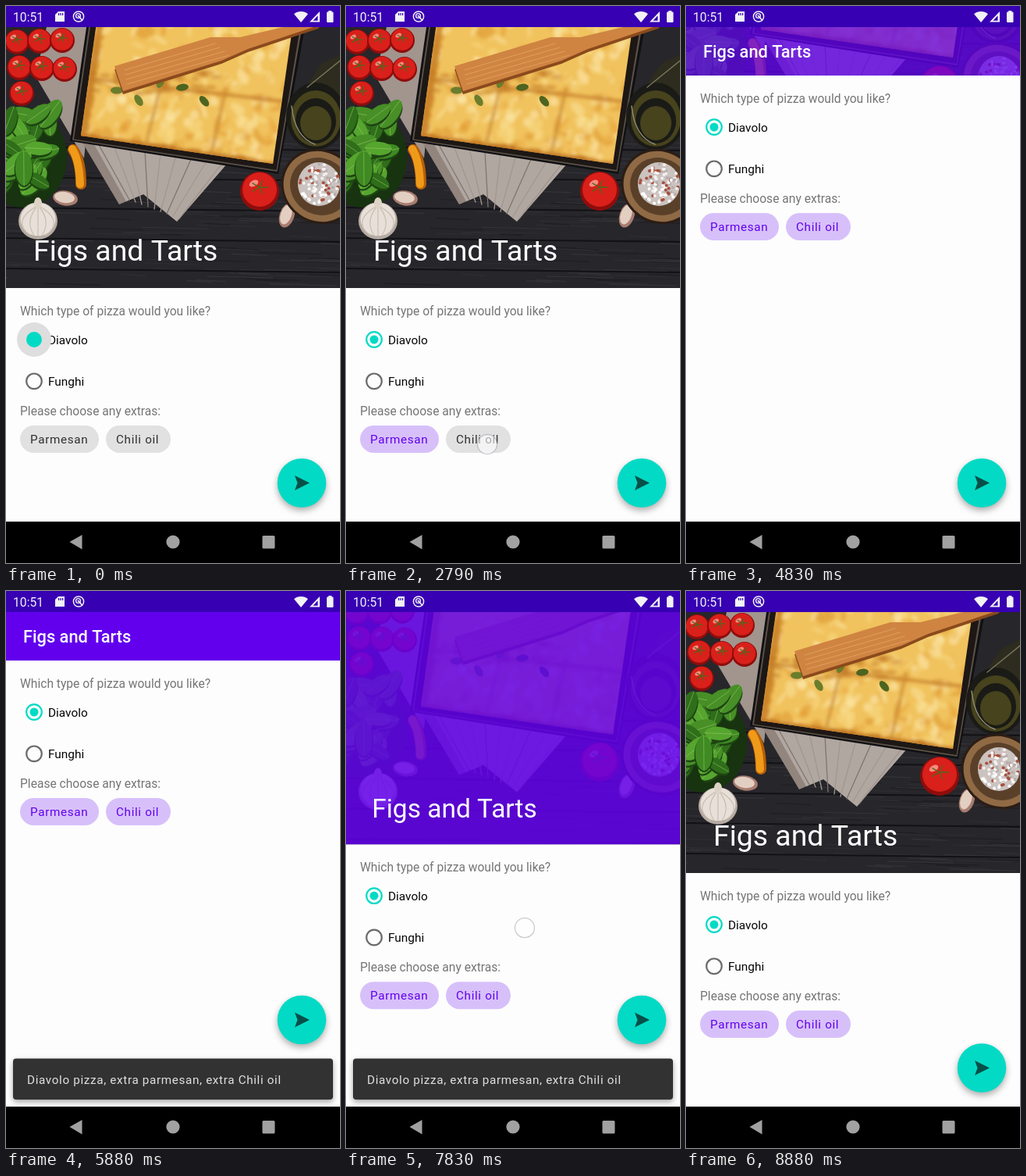
An HTML page with a canvas for the animation above (9.75 s loop, 428 by 713 pixels).

```html
<!DOCTYPE html>
<html lang="en">
<head>
<meta charset="utf-8">
<title>Pizza order screen</title>
<style>
html, body { margin: 0; width: 100%; height: 100%; overflow: hidden; background: #000; }
canvas { display: block; }
</style>
</head>
<body>
<canvas id="stage" width="428" height="713"></canvas>
<script>
const LOOP = 9750, W = 428, H = 713, BAR = 361, RANGE = 272, TAU = Math.PI * 2;
const PAPER = '#fdfdfd', TEAL = '#03dac5', PRIMARY = '#6200ee', STATUS = '#3700b3';
const GREY = '#757575', INK = '#f2f2f5';
const stage = document.getElementById('stage').getContext('2d');
let c = stage;

const clamp = x => Math.max(0, Math.min(1, x));
const span = (t, from, to) => clamp((t - from) / (to - from));
const mix = (a, b, p) => a + (b - a) * p;

let seed = 7;
const random = (from = 0, to = 1) => {
  seed = seed * 16807 % 2147483647;
  return mix(from, to, seed / 2147483647);
};
const pick = (...list) => list[Math.floor(random(0, list.length))];
const times = (n, draw) => { for (let i = 0; i < n; i++) draw(i); };

// ---- drawing helpers ----
function trace(...p) {
  c.beginPath();
  for (let i = 0; i < p.length; i += 2) c.lineTo(p[i], p[i + 1]);
  c.closePath();
}
function poly(color, ...p) {
  c.fillStyle = color;
  trace(...p);
  c.fill();
}
function oval(color, x, y, rx, ry = rx, angle = 0) {
  c.fillStyle = color;
  c.beginPath();
  c.ellipse(x, y, rx, ry, angle, 0, TAU);
  c.fill();
}
function ring(color, x, y, r, width) {
  c.strokeStyle = color;
  c.lineWidth = width;
  c.beginPath();
  c.arc(x, y, r, 0, TAU);
  c.stroke();
}
function curve(color, width, x, y, ...p) {
  c.strokeStyle = color;
  c.lineWidth = width;
  c.lineCap = 'round';
  c.beginPath();
  c.moveTo(x, y);
  c.quadraticCurveTo(...p);
  c.stroke();
}
const line = (color, width, x, y, x2, y2) => curve(color, width, x, y, x, y, x2, y2);
function box(color, x, y, w, h, r = 0) {
  c.fillStyle = color;
  c.beginPath();
  c.roundRect(x, y, w, h, r);
  c.fill();
}
function label(text, x, y, size, color, spacing = 0, weight = 400) {
  c.font = `${weight} ${size}px Roboto, sans-serif`;
  c.letterSpacing = spacing + 'px';
  c.fillStyle = color;
  c.fillText(text, x, y);
}
function withShadow(alpha, blur, dy, draw) {
  c.save();
  c.shadowColor = `rgba(0,0,0,${alpha})`;
  c.shadowBlur = blur;
  c.shadowOffsetY = dy;
  draw();
  c.restore();
}

// ---- header picture, painted once ----
function tomato(x, y, r) {
  oval('#8e0d0c', x, y, r);
  oval('#d9201a', x, y - r * .08, r * .88);
  oval('#f58d80', x - r * .3, y - r * .4, r * .25, r * .15, -.5);
  times(5, i => {
    const a = i * TAU / 5;
    line('#4c6a1e', 1.3, x, y - r * .2, x + Math.cos(a) * r * .45, y + (Math.sin(a) * .35 - .2) * r);
  });
}
function garlic(x, y, r) {
  oval('#b5aaa2', x, y, r, r * .95);
  oval('#e8e0d8', x, y - 2, r * .9, r * .85);
  times(5, i => curve('#c9bdb3', 1.2, x, y - r * .8, x + (i - 2) * r * .7, y, x + (i - 2) * r * .2, y + r * .75));
  oval('#ddd2c6', x, y - r * .9, r * .2, r * .3);
}
function clove(x, y, angle) {
  oval('#a87d70', x, y, 16, 9.5, angle);
  oval('#e3cfc2', x - 1, y - 1, 13, 7, angle);
}
function wood() {
  box('#27262a', 0, 0, W, BAR);
  times(160, () => {
    const x = random(-40, W), y = random(170, BAR);
    line(pick('#343338', '#1f1e22', '#2e2d31'), 1.2, x, y, x + random(30, 90), y + 2);
  });
  times(5, i => line('#121215', 2, 0, 180 + i * 39, W, 185 + i * 39));
}
function cloth() {
  poly('#a1958e', 58, 0, 120, 0, 100, 195, 38, 90);
  poly('#91857e', 92, 165, 120, 170, 190, 235, 145, 254);
  poly('#b1a7a1', 110, 172, 285, 200, 219, 276, 176, 241, 154, 250);
  times(9, i => line(i % 3 ? '#a2978f' : '#80756f', 1.3, 118 + i * 20, 176 + i * 3, 158 + i * 8, 248 + i * 3));
}
function lasagna() {
  const pan = (color, inset) =>
    poly(color, 107 + inset, 0, 388 - inset * 1.3, 0, 349 - inset / 2, 215 - inset, 82 + inset, 173 - inset / 2);
  pan('#111013', 0);
  pan('#5b5247', 3);
  pan('#1d1715', 5);
  c.save();
  trace(119, 0, 371, 0, 342, 202, 96, 166);
  c.clip();
  box('#f1c35e', 80, 0, 300, 220);
  c.filter = 'blur(2px)';
  times(260, () => oval(pick('#fbe6a480', '#f8d98490', '#d98a2470', '#fff0bd80', '#e9a63c80'),
    random(95, 370), random(0, 205), random(3, 13), random(2, 7), random(0, 3)));
  times(45, i => {
    oval('#b8651580', 95 + i * 5.6, 167 + i * .82, random(4, 10), random(2, 6));
    oval('#c4782090', 124 - i * .62, i * 4, random(3, 8), 5);
    oval('#b9691a70', random(110, 270), random(85, 112), random(3, 9), 3);
  });
  line('#c27b2a', 3, 100, 92, 355, 122);
  times(2, i => line('#c98a35', 3, 200 + i * 82, 95 + i * 10, 178 + i * 84, 182 + i * 12));
  c.restore();
  times(5, i => oval(pick('#4d6420', '#6a7d2c'), 142 + i * 28, 108 + 14 * Math.sin(i * 2), 8, 4.5, i));
}
function spatula() {
  const blade = (color, dy) =>
    poly(color, 139, 77 + dy, 262, 40 + dy, 300, 40 + dy, 410, 14 + dy, 400, 25 + dy, 310, 55 + dy, 276, 70 + dy, 150, 109 + dy);
  blade('#8a4a1c', 4);
  blade('#cf8442', 0);
  times(4, i => line('#e09c5a', 1.2, 152 + i, 82 + i * 6, 268 + i * 6, 48 + i * 5));
}
function vegetables() {
  times(7, i => {
    const row = Math.floor(i / 3), col = i % 3;
    tomato(14 + col * 29 + row * 3, 46 + row * 33 + col * 2 * (row - .5), 16);
  });
  oval('#17330f', 22, 194, 56, 64);
  times(34, () => {
    const x = random(-5, 62), y = random(138, 244), a = random(0, 3), r = random(14, 23);
    const dx = Math.cos(a) * r, dy = Math.sin(a) * r;
    oval('#1d4512', x, y + 2, r, r * .55, a);
    oval(pick('#3f8a22', '#56a52f', '#2f6e1a', '#478f26'), x, y, r, r * .5, a);
    line('#9ccb6a90', 1, x - dx, y - dy, x + dx, y + dy);
  });
  curve('#b55f08', 14, 86, 184, 96, 198, 96, 228);
  curve('#f09a1a', 10, 85, 183, 94, 198, 95, 228);
  garlic(41, 275, 25);
  clove(76, 246, .15);
  clove(360, 268, 1.9);
  tomato(325, 237, 25);
}
function oilAndSalt() {
  poly('#2d2c1e', 378, 112, 404, 74, 428, 62, 428, 124);
  times(4, i => oval(i % 2 ? '#46431d' : '#1a1a16', 397, 141 + i * 3, 38 - i * 6, 43 - i * 7));
  curve('#8d8b72', 1.5, 366, 128, 370, 168, 396, 177);
  line('#77755c', 1.5, 386, 104, 428, 70);
  const bowl = (color, r) => {
    c.lineJoin = 'round';
    oval(color, 402, 231, r * 1.08, r, .6);
  };
  bowl('#2b1d14', 47);
  bowl('#8f6a45', 44);
  bowl('#5a4029', 36);
  oval('#cbc3c0', 401, 228, 27, 28);
  times(110, () => {
    const a = random(0, TAU), r = Math.sqrt(random()) * 26;
    oval(pick('#f4f0f0', '#fff', '#a8503f', '#b5adab'), 401 + Math.cos(a) * r, 228 + Math.sin(a) * r, 2);
  });
}
function paintPhoto() {
  const sheet = document.createElement('canvas');
  sheet.width = W;
  sheet.height = BAR;
  c = sheet.getContext('2d');
  wood();
  cloth();
  lasagna();
  spatula();
  vegetables();
  oilAndSalt();
  c = stage;
  return sheet;
}
const photo = paintPhoto();

// ---- timeline ----
function scrollAt(t) {
  if (t < 7540) return RANGE * clamp((t - 3965) * .56 / RANGE);
  return Math.max(0, RANGE - 234 * ((t - 7540) / 290) ** 1.5);
}
const scrimAt = t => t < 7800 ? span(t, 4320, 4920) ** 1.6 : (1 - span(t, 7800, 8400)) ** 3;

// ---- screen parts ----
function radio(text, y, on, t) {
  label(text, 54, y + 5.8, 15.4, '#050505');
  if (!on) return ring('#6b6b6b', 36, y, 9.8, 2.2);
  const ripple = 1 - span(t, 40, 290);
  if (ripple) oval(`rgba(222,222,222,${ripple})`, 36, y, 22);
  const dot = mix(10, 5.5, span(t, 30, 190));
  if (dot < 8.7) ring(TEAL, 36, y, 9.8, 2.2);
  oval(TEAL, 36, y, dot);
}
function chip(text, x, w, t, press, release) {
  const on = t >= release;
  box(on ? '#d7c0fa' : '#e1e1e1', x, 537, w, 35, 17.5);
  const glow = span(t, press, press + 120) * (1 - span(t, release, release + 350));
  if (glow) box(`rgba(60,40,90,${glow * .14})`, x, 537, w, 35, 17.5);
  label(text, x + 13, 560, 15.26, on ? PRIMARY : '#303030', .65);
}
function form(t, off) {
  c.save();
  c.translate(0, -off);
  label('Which type of pizza would you like?', 18, 396, 15.6, GREY);
  radio('Diavolo', 427, true, t);
  radio('Funghi', 480.3, false, t);
  label('Please choose any extras:', 18, 524, 15.6, GREY);
  chip('Parmesan', 18, 101, t, 1130, 1260);
  chip('Chili oil', 128, 83, t, 2790, 2900);
  c.restore();
}
function header(t, off) {
  const f = off / RANGE;
  c.save();
  c.beginPath();
  c.rect(0, 0, W, BAR - off);
  c.clip();
  c.drawImage(photo, 0, -off / 2);
  c.globalAlpha = scrimAt(t);
  box(PRIMARY, 0, 0, W, BAR);
  c.restore();
  const size = mix(21.8, 37.4, (1 - f) ** 2);
  label('Figs and Tarts', mix(35, 22, f), mix(312.5, 58, f) + size * .355, size, '#fff', 0, f === 1 ? 500 : 400);
}
function statusBar() {
  box(STATUS, 0, 0, W, 27);
  label('10:51', 9, 20, 15.7, INK);
  poly(INK, 67, 7, 75, 7, 75, 20, 63, 20, 63, 11);
  times(3, i => box(STATUS, 67 + i * 2.5, 9, 1.2, 3));
  ring(INK, 93, 13.5, 6.6, 1.5);
  ring(INK, 92.5, 12.5, 2.9, 1.4);
  line(INK, 1.8, 92.5, 12.5, 97.5, 18);
  c.fillStyle = INK;
  c.beginPath();
  c.moveTo(378, 21);
  c.arc(378, 21, 14, -TAU * .36, -TAU * .14);
  c.fill();
  poly(INK, 389, 20.5, 402, 20.5, 402, 7);
  poly(STATUS, 393.5, 18.8, 399.5, 18.8, 399.5, 12.3);
  box(INK, 411, 7.5, 8.5, 13.5, 1.2);
  box(INK, 413.3, 6, 4, 3);
}
function navBar() {
  const icon = '#a1a1a1';
  box('#000', 0, 660, W, H - 660);
  poly(icon, 81.5, 686, 97.5, 677, 97.5, 695.5);
  oval(icon, 214, 686, 8.6);
  box(icon, 328.5, 678, 16, 16.5, 1.5);
}
function fab(t) {
  const y = t >= 5560 && t < 8550 ? 549 : 610.5;
  const press = span(t, 5330, 5450) * (1 - span(t, 5500, 5860));
  withShadow(.32, 9 + press * 5, 4 + press * 2, () => oval(TEAL, 379, y, 31.3));
  if (press) oval(`rgba(255,255,255,${press * .22})`, 379, y, 31.3);
  poly('#075049', 370, y - 9.5, 389, y, 370, y + 9.5, 373.5, y);
}
function snackbar(t) {
  const show = span(t, 5560, 5710), hide = span(t, 8460, 8540);
  if (!show || hide === 1) return;
  const scale = mix(.8, 1, 1 - (1 - show) ** 3);
  c.save();
  c.globalAlpha = show * (1 - hide);
  c.translate(214, 625);
  c.scale(scale, scale);
  c.translate(-214, -625);
  withShadow(.35, 7, 3, () => box('#323232', 9, 598.5, 410, 52.5, 4));
  label('Diavolo pizza, extra parmesan, extra Chili oil', 27, 630.5, 15.26, '#e0e0e0', .65);
  c.restore();
}
function touches(t, off) {
  const touch = (from, to, x, y) => {
    if (t < from || t >= to) return;
    oval('rgba(255,255,255,.6)', x, y, 12.5);
    ring('rgba(150,150,165,.5)', x, y, 12.5, 1.3);
  };
  touch(1130, 1260, 76, 559);
  touch(2790, 2900, 181, 561);
  touch(3880, 4420, 263 + (t - 4130) * .03, 488 - off);
  touch(5330, 5460, 380, 613);
  touch(7460, 7920, 229, 196 + RANGE - off);
}

function render(t) {
  const off = scrollAt(t);
  box(PAPER, 0, 0, W, H);
  form(t, off);
  header(t, off);
  statusBar();
  fab(t);
  snackbar(t);
  navBar();
  touches(t, off);
}

const start = performance.now();
function tick() {
  render((performance.now() - start) % LOOP);
  requestAnimationFrame(tick);
}
tick();
</script>
</body>
</html>
```
